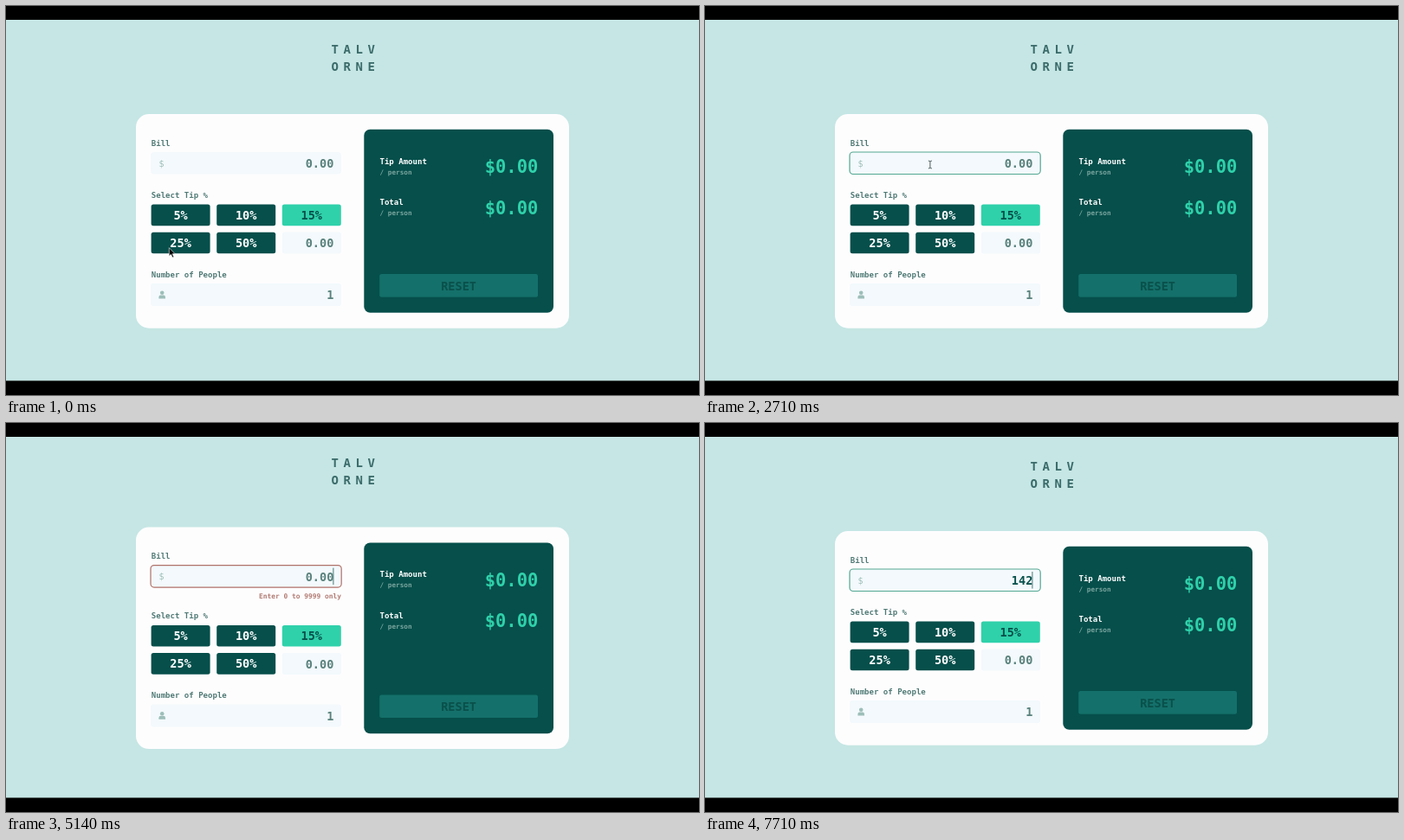
Recreate the animation shown at these times as an HTML page. Size 800 by 450 pixels, loop 8000 ms.

```html
<!DOCTYPE html>
<html lang="en">
<head>
<meta charset="utf-8">
<title>Tip calculator</title>
<style>
  html, body { margin: 0; width: 100%; height: 100%; overflow: hidden; background: #000; }
  svg { display: block; width: 100%; height: 100%; }
  text { font: bold 9.04px "DejaVu Sans Mono", monospace; fill: #4f7a75; white-space: pre; }
  .logo { font-size: 14px; letter-spacing: 5.5px; fill: #3b6b6a; }
  .value { font-size: 13.55px; text-anchor: end; fill: #5a827d; }
  .typed { fill: #07504b; }
  .option { font-size: 13.55px; text-anchor: middle; fill: #fff; }
  .dark { fill: #064f4b; }
  .mint { fill: #2fd1aa; }
  .field { fill: #f3f9fc; }
  .icon, text.icon { fill: #9dbeb9; }
  text.icon { font-size: 10px; font-weight: normal; text-anchor: middle; }
  .title { fill: #fff; }
  .unit { font-size: 7.7px; fill: #7ba59f; }
  .amount { font-size: 20.4px; text-anchor: end; fill: #2fd1aa; }
  .error { font-size: 7.9px; text-anchor: end; fill: #b17c73; }
</style>
</head>
<body>
<svg viewBox="0 0 800 450">
  <rect y="16" width="800" height="417.5" fill="#c5e6e4"/>
  <rect id="card" x="150" width="500" rx="15" fill="#fefdfe"/>
  <rect id="panel" class="dark" x="413.3" width="218.7" rx="7"/>

  <g class="upper">
    <text class="logo" x="375.6" y="55">TALV</text>
    <text class="logo" x="375.6" y="75">ORNE</text>
    <text x="167.8" y="161.8">Bill</text>
    <g id="bill">
      <rect class="field" x="167" y="169" width="220" height="25.5" rx="4"/>
      <rect id="border" x="167" y="169" width="220.2" height="25.5" rx="4" fill="none" stroke-width="1.2"/>
      <text class="icon" x="179.6" y="185.7">$</text>
      <text id="entry" x="378.3" y="187"></text>
      <rect id="caret" x="377.4" y="172" width="1" height="19.5" fill="#477874"/>
    </g>
    <text id="error" class="error" x="387" y="207.2">Enter 0 to 9999 only</text>
    <g id="rows"></g>
  </g>

  <g class="lower">
    <text x="167.8" y="221.8">Select Tip %</text>
    <g id="options"></g>
    <rect class="field" x="319" y="261.6" width="68" height="25" rx="2.5"/>
    <text class="value" x="378.3" y="279.2">0.00</text>
    <text x="167.8" y="314">Number of People</text>
    <rect class="field" x="167" y="321" width="220" height="26" rx="3"/>
    <g class="icon">
      <circle cx="180.2" cy="331.8" r="2.3"/>
      <path d="M176.4 338.4v-1.6q0-2.4 2.2-2.4h3.2q2.2 0 2.2 2.4v1.6z"/>
    </g>
    <text class="value" x="378.3" y="339.3">1</text>
    <rect x="431.2" y="310" width="182.8" height="26.7" rx="2.5" fill="#14706a"/>
    <text class="option" x="522.6" y="328.6" style="fill:#0a504b">RESET</text>
  </g>

  <g id="cursor">
    <path id="arrow" d="M0 0v9.6l2.2-2 1.6 3.6 1.6-.7-1.6-3.5h3z" fill="#000" stroke="#fff" stroke-width=".6"/>
    <path id="beam" d="M-2-4.4Q0-4.4 0-3.2Q0-4.4 2-4.4M0-3.2V3.2M-2 4.4Q0 4.4 0 3.2Q0 4.4 2 4.4" fill="none" stroke="#3a4a4a" stroke-width=".9"/>
  </g>
</svg>
<script>
const TICKS_PER_SECOND = 7, LOOP = 8000;
const $ = id => document.getElementById(id);

$("options").innerHTML = [5, 10, 15, 25, 50].map((percent, i) => {
  const x = 167.6 + i % 3 * 75.6, y = i < 3 ? 229.6 : 261.7;
  const picked = percent === 15;
  return `<rect class="${picked ? "mint" : "dark"}" x="${x}" y="${y}" width="68" height="24.6" rx="2.5"/>
    <text class="option${picked ? " typed" : ""}" x="${x + 34}" y="${y + 17.4}"
      ${picked ? 'style="fill:#07504b"' : ""}>${percent}%</text>`;
}).join("");

$("rows").innerHTML = ["Tip Amount", "Total"].map((title, i) => {
  const y = 182.6 + i * 47.6;
  return `<text class="title" x="431.5" y="${y}">${title}</text>
    <text class="unit" x="431.5" y="${y + 12}">/ person</text>
    <text class="amount" x="614.2" y="${y + 10.6}">$0.00</text>`;
}).join("");

// Each entry takes effect from its tick on.
const typing = [[0, ""], [21, "-"], [25, "-9"], [36, ""], [46, "1"], [52, "14"], [54, "142"]];
const caretToggles = [6, 10, 14, 19, 21, 29, 34, 39, 42, 50, 52];
const shakeStarts = [21, 25, 36];
const shakeOffsets = [0, 2, 4.6, 0];
const FOCUS = 6, ERROR_ON = 21, ERROR_OFF = 46;
const GREEN = "#52a791", RED = "#b07168", GREY = "#5b8985";

const clamp = v => Math.max(0, Math.min(1, v));
const mix = (from, to, p) => `color-mix(in srgb, ${to} ${clamp(p) * 100}%, ${from})`;
const show = (id, on) => $(id).setAttribute("visibility", on ? "visible" : "hidden");
const move = (el, x, y) => el.setAttribute("transform", `translate(${x} ${y})`);

function borderColor(tick) {
  if (tick < FOCUS) return "none";
  if (tick < ERROR_ON) return mix(GREY, GREEN, (tick - FOCUS) / 3);
  if (tick < ERROR_OFF) return mix(GREEN, RED, (tick - ERROR_ON) / 2);
  return mix(RED, GREEN, (tick - ERROR_OFF) / 4);
}

function drawLayout(hasError) {
  const grow = hasError ? 4.4 : 0;
  for (const [id, top, height] of [["card", 125, 247.7], ["panel", 142.8, 212]]) {
    $(id).setAttribute("y", top - grow);
    $(id).setAttribute("height", height + 2 * grow);
  }
  move(document.querySelector(".upper"), 0, -grow);
  move(document.querySelector(".lower"), 0, grow);
  show("error", hasError);
}

function drawCursor(tick) {
  const p = clamp(tick / 6), ease = p * p * (3 - 2 * p);
  const settle = clamp((tick - 6) / 4);
  const x = 188.3 + 70 * ease + 1.6 * settle;
  const y = 279.7 - 95 * ease - 1.2 * settle;
  const overField = y < 195;
  move($("cursor"), x, y);
  show("arrow", !overField && tick < ERROR_ON);
  show("beam", overField && tick < ERROR_ON);
}

function draw(tick) {
  drawLayout(tick >= ERROR_ON && tick < ERROR_OFF);
  drawCursor(tick);
  const text = typing.findLast(([start]) => tick >= start)[1];
  $("entry").textContent = text || "0.00";
  $("entry").setAttribute("class", text ? "value typed" : "value");
  $("border").setAttribute("style", `stroke:${borderColor(tick)}`);
  show("caret", caretToggles.filter(t => t <= tick).length % 2);
  const shake = shakeStarts.findLast(t => t <= tick);
  move($("bill"), shakeOffsets[tick - shake] || 0, 0);
}

function frame() {
  draw(Math.floor((performance.now() % LOOP + 5) * TICKS_PER_SECOND / 1000) % 56);
  requestAnimationFrame(frame);
}
frame();
</script>
</body>
</html>
```
